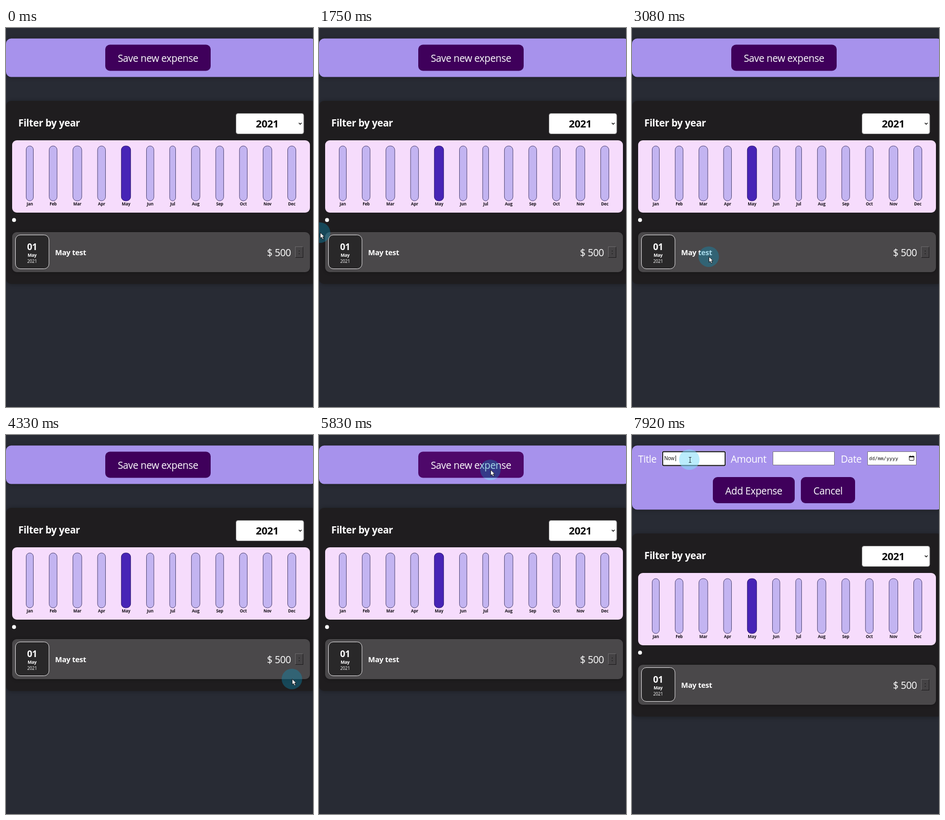
These frames come from a looping animation (600 px wide and 739 px high, 8 s). An HTML page with a canvas:

```html
<!DOCTYPE html>
<html lang="en">
<head>
<meta charset="utf-8">
<title>Expense tracker</title>
<style>
html, body { margin: 0; width: 100%; height: 100%; overflow: hidden; background: #282b34; }
canvas { display: block; width: 600px; height: 739px; }
</style>
</head>
<body>
<canvas id="stage" width="600" height="739"></canvas>
<script>
const ctx = document.getElementById('stage').getContext('2d');
const LOOP = 8000, STEP = 1000 / 12;
const UI = '"Open Sans", "Noto Sans", sans-serif';
const MONO = '"DejaVu Sans Mono", monospace';
const ARIAL = '"Liberation Sans", Arial, sans-serif';
const OPEN = 6080, FOCUS = 6580, FORM_SHIFT = 49.7;
const months = 'Jan Feb Mar Apr May Jun Jul Aug Sep Oct Nov Dec'.split(' ');
const center = { align: 'center' };

// Each leg is an elliptic arc to a point, bowed sideways, lasting some half turns.
const leg = (t, x, y, bow = 0, halfTurns = 1) => ({ t, x, y, bow, halfTurns });
const legs = [
  leg(0, 680, 206),
  leg(80, 606, 206),
  leg(500, 72, 382, -60),
  leg(830, 72, 382),
  leg(1250, 555, 350),
  leg(1750, 2, 399),
  leg(3080, 150, 446, 45, 3),
  leg(3250, 88, 395),
  leg(4080, 561, 455, -30),
  leg(4330, 560, 476),
  leg(4920, 574, 400, -70),
  leg(5080, 574, 400),
  leg(5500, 33, 340, -40),
  leg(5830, 335, 68),
  leg(6080, 335, 68),
  leg(6330, 111, 49),
  leg(6750, 111, 49),
  leg(6870, 150, 49),
  leg(7000, 112, 48),
  leg(LOOP, 112, 48)
];

function pointer(t) {
  const i = legs.findIndex(l => l.t > t), a = legs[i - 1], b = legs[i];
  const phi = Math.PI * b.halfTurns * (t - a.t) / (b.t - a.t);
  const dx = b.x - a.x, dy = b.y - a.y;
  const along = (1 - Math.cos(phi)) / 2;
  const side = b.bow * Math.sin(phi) / (Math.hypot(dx, dy) || 1);
  return [a.x + dx * along - dy * side, a.y + dy * along + dx * side];
}

function box(x, y, w, h, r, fill, stroke, lw = 1) {
  ctx.beginPath();
  ctx.roundRect(x, y, w, h, r);
  if (fill) { ctx.fillStyle = fill; ctx.fill(); }
  if (stroke) { ctx.strokeStyle = stroke; ctx.lineWidth = lw; ctx.stroke(); }
}

function shadowed(blur, ...args) {
  ctx.save();
  ctx.shadowColor = 'rgba(0,0,0,.3)';
  ctx.shadowBlur = blur;
  ctx.shadowOffsetY = 1;
  box(...args);
  ctx.restore();
}

function setFont(size, bold, font = UI) {
  ctx.font = `${bold ? 700 : 400} ${size}px ${font}`;
  ctx.letterSpacing = font === UI ? `${-0.02 * size}px` : '0px';
}

function text(s, x, y, size, { bold, align = 'left', color = '#fff', font } = {}) {
  setFont(size, bold, font);
  ctx.textAlign = align;
  ctx.fillStyle = color;
  ctx.fillText(s, x, Math.round(y));
}

const bold = opts => ({ ...opts, bold: true });

function button(x, y, w, label, hover) {
  box(x, y, w, 51, 9, hover ? '#4e086a' : '#3f005b');
  text(label, x + w / 2, y + 33.6, 19.2, center);
}

function calendarIcon(x, y) {
  box(x + .5, y + 1.5, 9, 8, 1, null, '#111');
  ctx.fillStyle = '#111';
  ctx.fillRect(x, y + 1, 10, 2.5);
  ctx.fillRect(x + 2, y, 1, 2);
  ctx.fillRect(x + 7, y, 1, 2);
}

function titleFocus(t) {
  box(58.8, 31.3, 124.4, 29.4, 3, null, 'rgba(255,255,255,.5)');
  box(60, 32.5, 122, 27, 2, '#fff', '#111', 1.8);
  const typed = 'Now'.slice(0, (t >= 7410) + (t >= 7580) + (t >= 7830));
  text(typed, 63, 49, 10, { font: ARIAL, color: '#111' });
  const x = 63 + ctx.measureText(typed).width + (typed ? 2 : 0);
  ctx.fillRect(Math.round(x), 40, 1, 11);
}

function header(form, t, hover) {
  shadowed(8, 0, 20.5, 606, form ? 125 : 75, 10, '#a792ec');
  if (!form) return button(194, 32.5, 206, 'Save new expense', hover);

  const field = (label, labelX, x, w) => {
    text(label, labelX, 54, 19.2);
    box(x + .5, 32.5, w - 1, 26, 0, '#fff', '#77747c');
  };
  field('Title', 12, 60, 122);
  field('Amount', 193, 275, 121);
  field('Date', 408, 460, 96);
  text('dd/mm/yyyy', 463, 49, 9.5, { font: MONO, color: '#111' });
  calendarIcon(541.5, 40);
  if (t >= FOCUS) titleFocus(t);
  button(158, 82, 160, 'Add Expense');
  button(330, 82, 106, 'Cancel');
}

function yearSelect(y) {
  box(449.5, y + .5, 132.5, 40, 4, '#fff', '#767676');
  text('2021', 510.5, y + 28, 20.2, bold({ ...center, color: '#0b0b0b' }));
  ctx.beginPath();
  ctx.moveTo(572.3, y + 19);
  ctx.lineTo(575, y + 21.7);
  ctx.lineTo(577.7, y + 19);
  ctx.strokeStyle = '#111';
  ctx.lineWidth = 1.5;
  ctx.stroke();
}

// Bars are as wide as their labels, with equal space around each.
function chart(y) {
  box(12, y, 582, 141, 9, '#f6dcfc');
  setFont(8.1, true);
  const widths = months.map(m => ctx.measureText(m).width + 1.6);
  const gap = (558 - widths.reduce((a, b) => a + b)) / months.length;
  let x = 24 + gap / 2;
  months.forEach((m, i) => {
    const w = widths[i], on = m === 'May';
    box(x, y + 11, w, 107, Math.min(8, w / 2),
      on ? '#4724b6' : '#c3b4f1', on ? '#2d176f' : '#514675');
    text(m, x + w / 2, y + 127, 8.1, bold({ ...center, color: '#17121a' }));
    x += w + gap;
  });
}

function deleteButton(x, y) {
  ctx.fillStyle = '#6b696b';
  ctx.fillRect(x, y, 16, 22);
  ctx.fillStyle = '#1e1c1e';
  ctx.beginPath();
  ctx.moveTo(x + 16, y);
  ctx.lineTo(x + 16, y + 22);
  ctx.lineTo(x, y + 22);
  ctx.fill();
  ctx.fillStyle = '#454345';
  ctx.fillRect(x + 1, y + 1, 14, 20);
  text(':', x + 8, y + 15, 12, { ...center, color: '#0a0a0a' });
}

function panel(dy) {
  const Y = y => Math.round(y + dy);
  shadowed(8, 0, Y(142.3), 606, 357, 10, '#1f1d1f');
  text('Filter by year', 24, Y(192), 19.2, bold());
  yearSelect(Y(166));
  chart(Y(219));

  ctx.beginPath();
  ctx.arc(15.7, Y(374) + .4, 3.8, 0, 7);
  ctx.fillStyle = '#fff';
  ctx.fill();

  shadowed(6, 12, Y(398), 582, 78, 9, '#4a484a');
  box(18.5, Y(403.3) + .5, 65.5, 66, 9.5, '#292829', '#e4e2e4');
  text('01', 51, Y(432.8), 17.6, bold(center));
  text('May', 51, Y(446), 8.6, bold(center));
  text('2021', 51, Y(458), 8.6, center);
  text('May test', 96, Y(443), 14.5, bold());
  text('$ 500', 510, Y(445), 19.2);
  deleteButton(565, Y(426));
}

// The halo is paler over light surfaces than over dark ones.
function halo(x, y, form, dy) {
  const light = new Path2D(), dark = new Path2D();
  light.roundRect(0, 20.5, 606, form ? 125 : 75, 10);
  if (form) {
    light.roundRect(158, 82, 160, 51, 9);
    light.roundRect(330, 82, 106, 51, 9);
  } else light.roundRect(194, 32.5, 206, 51, 9);
  light.roundRect(12, 219 + dy, 582, 141, 9);
  light.rect(449, 166 + dy, 133, 41);
  dark.rect(0, 0, 600, 739);
  dark.addPath(light);
  for (const [area, color] of [[dark, 'rgba(11,146,190,.36)'], [light, 'rgba(130,220,250,.55)']]) {
    ctx.save();
    ctx.clip(area, 'evenodd');
    ctx.beginPath();
    ctx.arc(x, y, 20, 0, 7);
    ctx.fillStyle = color;
    ctx.fill();
    ctx.restore();
  }
}

function arrow(x, y) {
  ctx.beginPath();
  [[0, 0], [0, 11], [2.6, 8.8], [4.6, 13], [6.6, 12], [4.7, 8], [8.2, 8]]
    .forEach(([a, b]) => ctx.lineTo(x + a, y + b));
  ctx.closePath();
  ctx.fillStyle = '#fff';
  ctx.strokeStyle = '#16181c';
  ctx.lineWidth = 1;
  ctx.fill();
  ctx.stroke();
}

function beam(x, y) {
  ctx.fillStyle = '#26343c';
  ctx.fillRect(x, y - 5, 1, 11);
  ctx.fillRect(x - 2, y - 5, 5, 1);
  ctx.fillRect(x - 2, y + 5, 5, 1);
}

function draw(now) {
  const t = Math.floor((now % LOOP + 4) / STEP) * STEP % LOOP;
  const form = t + 5 >= OPEN, dy = form ? FORM_SHIFT : 0;
  const [x, y] = pointer(t);
  const hover = !form && x > 194 && x < 400 && y > 32 && y < 84;

  ctx.fillStyle = '#282b34';
  ctx.fillRect(0, 0, 600, 739);
  header(form, t + 5, hover);
  panel(dy);
  halo(x, y, form, Math.round(dy));
  if (form && y < 60 && x > 60 && x < 182) beam(Math.round(x) + 1, Math.round(y));
  else arrow(x + .5, y);
}

const start = performance.now();
function tick() {
  draw(performance.now() - start);
  requestAnimationFrame(tick);
}
tick();
</script>
</body>
</html>
```
